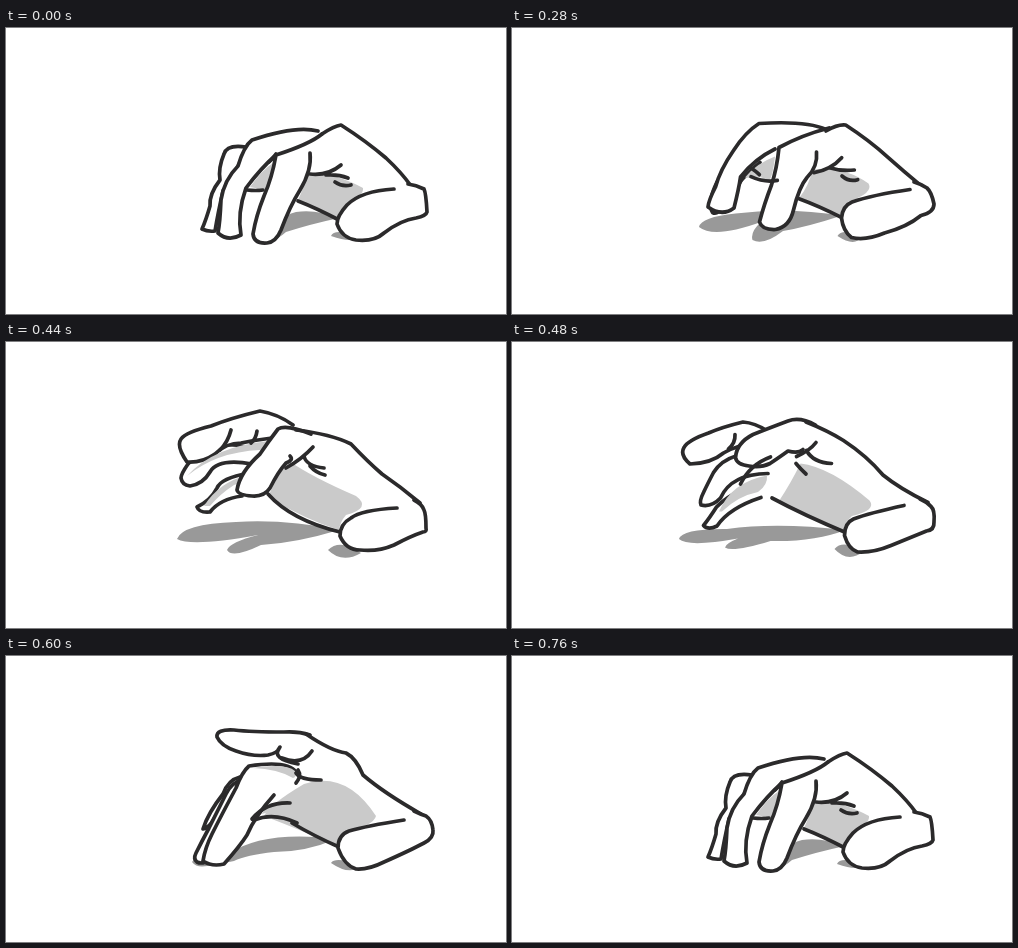
These frames come from a looping animation (500x286 px, 800 ms). An HTML page without scripts:

```html
<!DOCTYPE html>
<html lang="en">
<head>
<meta charset="utf-8">
<title>Drumming fingers</title>
<style>
html, body { margin: 0; width: 100%; height: 100%; overflow: hidden; background: #fff; }
svg { display: block; width: 100vw; height: 100vh; }

/* Poses are redrawn every 40 ms, so each move is cut into steps */
path {
  fill: #fff; stroke: #2b2a2b; stroke-width: 3.7;
  stroke-linecap: round; stroke-linejoin: round;
  animation: 800ms steps(2) infinite;
}
.flat { stroke: none; }
.shadow { fill: #999; animation-name: shadow; }
.hull { animation-name: hull; }
.pinky { animation-name: pinky; }
.ring { animation-name: ring; }
.middle { animation-name: middle; }
.tone { fill: #cacaca; animation-name: tone; }
.palm { fill: #cacaca; animation-name: palm; }
.lines { fill: none; animation-name: lines; }
.index { animation-name: index; }
.heel { animation-name: heel; }

@keyframes shadow {
  0%, 24.999%, 95%, 100% { d: path("M272 200Q278 186 290 184Q310 181 333 190Q305 196 280 204Q272 211 268 211Q266 208 268 204Q270 202 272 200ZM325 208Q328 200 352 208Q348 216 325 208Z") }
  25% { animation-timing-function: steps(4); d: path("M194 200Q198 192 232 187Q280 178 330 189Q300 196 278 203Q265 214 248 214Q244 208 250 196Q212 208 194 200ZM326 210Q330 200 352 210Q346 221 326 210Z") }
  45% { d: path("M180 198Q180 186 215 184Q270 180 330 186Q290 202 264 203Q238 222 233 210Q232 200 248 192Q192 214 180 198ZM325 206Q330 200 348 207Q340 218 325 206Z") }
  55% { d: path("M171 197Q176 182 230 180Q280 177 333 188Q290 201 255 203Q226 217 221 208Q224 200 252 193Q186 205 171 197ZM322 208Q334 196 355 211Q336 222 322 208Z") }
  65% { d: path("M163 197Q164 191 200 194Q250 183 334 188Q315 199 262 195Q215 204 205 203Q203 203 200 200Q166 206 163 197ZM323 206Q328 198 348 208Q336 221 323 206Z") }
  75% { animation-timing-function: steps(4); d: path("M186 206Q190 198 222 198Q258 174 330 183Q300 196 268 196Q240 199 228 205Q215 208 208 208Q192 214 186 206ZM325 207Q330 200 355 210Q344 220 325 207Z") }
}
@keyframes hull {
  0%, 24.999%, 90%, 100% { d: path("M268 130L312 106L334 97L380 130L404 157L388 185L332 192L292 173L275 165Z") }
  25% { animation-timing-function: steps(4); d: path("M268 130L310 105L328 97L370 124L408 157L390 185L330 190L290 172L275 165Z") }
  45% { d: path("M262 108L300 98L343 99L372 132L410 160L390 185L330 188L290 170L275 155Z") }
  55% { d: path("M275 88L300 92L343 101L372 128L412 160L390 185L335 190L268 158L262 145Z") }
  65% { d: path("M270 95L300 73L322 96L362 130L418 160L390 185L330 190L285 165L268 150Z") }
  75% { animation-timing-function: steps(3); d: path("M262 105L300 80L342 98L364 126L415 160L390 185L330 190L285 165L262 140Z") }
}
@keyframes pinky {
  0%, 24.999%, 90%, 100% { d: path("M232 122Q222 126 220 140Q210 175 205 196Q207 200 210 195Q220 160 232 130") }
  25% { animation-timing-function: steps(4); d: path("M240 125Q232 130 225 150Q217 180 212 195Q216 200 222 195Q230 170 240 140") }
  45% { d: path("M225 150Q215 155 208 160Q200 163 199 168Q203 172 207 168Q215 160 225 152") }
  55% { d: path("M243 131Q215 136 211 146Q205 158 191 165Q193 171 204 170Q214 157 236 154") }
  65% { d: path("M225 160Q212 175 198 184Q190 194 192 202Q199 206 206 198Q220 175 262 157") }
  75% { animation-timing-function: steps(3); d: path("M234 121Q222 124 217 138Q202 157 197 173Q203 172 208 163Q218 145 230 130") }
}
@keyframes ring {
  0%, 24.999%, 90%, 100% { d: path("M240 119Q221 116 218 126Q212 140 214 152Q203 166 204 178Q200 192 196 201Q202 204 209 203Q212 185 217 163") }
  25% { animation-timing-function: steps(4); d: path("M241 112Q230 116 227 124Q220 135 214 148Q207 165 204 175Q200 188 198 194Q201 198 206 195Q212 170 238 116") }
  45% { d: path("M225 148Q215 150 208 153Q200 158 196 160Q193 163 194 168Q196 174 203 175Q210 176 215 163Q225 149 258 153") }
  55% { d: path("M240 105Q220 100 205 106Q190 112 182 122Q175 132 175 136Q176 143 184 144Q197 142 204 130Q212 116 246 122") }
  65% { d: path("M268 126Q258 122 243 122Q228 125 221 139Q215 154 208 165Q198 176 194 182Q202 189 213 182Q226 148 266 141") }
  75% { animation-timing-function: steps(3); d: path("M236 124Q226 126 220 138Q210 158 203 172Q196 185 190 197Q187 203 191 206Q195 208 199 206Q212 175 240 130") }
}
@keyframes middle {
  0%, 24.999%, 95%, 100% { d: path("M312 103Q290 97 246 112Q238 118 232 138Q218 152 215 172Q214 195 212 205Q222 214 235 207Q231 185 240 160Q255 140 270 127") }
  25% { animation-timing-function: steps(4); d: path("M314 103Q300 97 242 111Q233 122 228 140Q216 162 211 182Q203 198 206 204Q224 212 231 198Q236 170 235 160Q250 140 270 130") }
  45% { d: path("M314 100Q290 88 252 80Q234 86 215 105Q200 122 196 136Q190 147 186 154Q196 166 213 162Q218 150 222 138Q235 122 256 112") }
  55% { d: path("M287 83Q272 72 254 69Q225 76 205 84Q180 90 175 97Q170 104 181 120Q196 121 209 112Q220 101 235 101Q250 98 266 96") }
  65% { d: path("M222 94Q214 90 208 91Q196 94 188 98Q171 107 169 114Q165 122 175 124Q202 122 214 110Q232 104 250 103Q266 108 269 128") }
  75% { animation-timing-function: steps(4); d: path("M290 116Q282 104 243 110Q236 116 230 132Q215 160 206 178Q199 192 197 205Q206 211 218 208Q234 190 241 179Q249 160 268 139") }
}
@keyframes tone {
  0%, 24.999%, 95%, 100% { d: path("M267 135Q256 142 244 159Q255 161 262 161Q266 150 267 135ZM250 160Q252 160 254 160Q254 161 252 161Q250 161 250 160Z") }
  25% { animation-timing-function: steps(4); d: path("M266 137Q248 147 238 160Q252 164 265 163Q267 150 266 137ZM250 160Q252 160 254 160Q254 161 252 161Q250 161 250 160Z") }
  45% { d: path("M260 120Q240 124 228 139Q240 136 247 145Q254 152 260 120ZM240 137Q244 137 248 140Q246 140 244 140Q242 140 240 137Z") }
  55% { d: path("M181 134Q208 104 263 99Q262 106 254 108Q210 110 181 134ZM198 164Q213 140 242 133Q240 140 228 143Q214 152 204 164Z") }
  65% { d: path("M259 99Q279 108 277 122Q274 130 271 126Q271 110 259 99ZM216 175Q226 140 268 134Q272 146 264 157Q238 156 216 175Z") }
  75% { animation-timing-function: steps(4); d: path("M247 112Q280 107 289 115Q291 121 287 122Q272 113 247 112ZM256 158Q260 148 268 147Q275 148 270 152Q264 156 256 158Z") }
}
@keyframes palm {
  0%, 24.999%, 95%, 100% { d: path("M300 146Q325 143 357 160Q358 168 340 177Q332 184 331 190Q308 182 292 172Q298 160 300 146Z") }
  25% { animation-timing-function: steps(4); d: path("M303 143Q332 140 355 154Q362 163 335 175Q330 182 328 189Q308 180 288 170Q298 158 303 143Z") }
  45% { d: path("M298 140Q330 135 358 157Q362 167 338 172Q331 180 329 187Q308 180 286 170Q296 158 298 140Z") }
  55% { d: path("M283 119Q306 135 350 154Q366 166 340 173Q334 180 333 188Q300 178 262 155Q270 135 283 119Z") }
  65% { d: path("M294 124Q330 115 365 163Q364 170 340 175Q331 181 330 189Q298 170 272 163Q286 150 294 124Z") }
  75% { animation-timing-function: steps(4); d: path("M298 128Q340 114 370 160Q368 169 338 178Q331 184 330 190Q300 176 258 160Q264 148 298 128Z") }
}
/* back of the hand, palm edge, then short creases */
@keyframes lines {
  0%, 24.999%, 90%, 100% { d: path("M316 106Q328 98 335 97Q360 113 380 130Q396 145 405 158M292 173Q310 180 333 192M304 146Q322 148 335 137M320 147Q332 146 342 150M329 154Q336 159 345 157M241 162Q250 163 257 162M263 134Q268 129 270 126") }
  25% { animation-timing-function: steps(3); d: path("M314 105Q324 96 329 96Q355 112 378 128Q395 142 408 157M288 171Q308 178 329 190M302 146Q320 142 329 129M318 141Q330 146 343 142M331 149Q338 155 345 153M237 161Q252 166 266 163M233 150Q236 155 235 161") }
  45% { animation-timing-function: steps(2); d: path("M314 99Q330 96 343 99Q362 113 372 132Q384 145 410 158M285 170Q305 178 330 188M302 142Q318 140 331 131M316 137Q328 138 341 142M328 146Q336 153 347 149M243 124Q255 133 264 131M248 118Q262 122 272 118") }
  55% { d: path("M290 88Q325 92 345 102Q362 120 376 132Q395 145 414 161M262 152Q285 178 334 190M280 126Q296 117 307 105M298 114Q300 124 318 126M304 124Q310 131 319 133M214 108Q222 100 225 88M245 101Q250 97 251 89") }
  65% { d: path("M298 72Q306 85 318 95Q348 108 366 134Q380 148 418 160M258 160Q298 168 338 193M289 103Q300 100 301 96M291 103Q302 117 321 117M264 119Q268 124 269 131M219 106Q225 102 221 97M212 183Q226 148 266 141") }
  75% { animation-timing-function: steps(3); d: path("M300 78Q325 95 340 97Q350 102 357 119Q378 137 415 158M286 167Q308 180 333 191M276 102Q296 110 306 95M290 117Q294 124 315 124M292 114Q296 120 290 127M248 164Q268 156 291 167M246 163Q260 146 284 147") }
}
@keyframes index {
  0%, 24.999%, 95%, 100% { d: path("M316 106Q304 116 270 127Q266 150 258 168Q250 188 247 206Q248 216 261 215Q270 214 275 202Q284 178 294 162Q306 142 304 125") }
  25% { animation-timing-function: steps(4); d: path("M318 102Q305 112 268 129Q270 150 262 168Q254 188 249 204Q250 214 265 214Q279 210 281 192Q286 168 296 155Q306 142 303 128") }
  45% { d: path("M316 98Q275 102 266 110Q260 130 257 146Q250 165 246 184Q250 190 262 189Q276 188 282 172Q288 150 294 144Q306 135 306 120") }
  55% { d: path("M305 92Q280 82 272 87Q262 100 254 112Q234 130 231 148Q232 153 246 154Q258 155 264 146Q272 130 280 121Q288 118 284 114") }
  65% { d: path("M302 74Q296 67 280 71Q250 73 228 73Q215 72 216 83Q217 92 228 94Q240 97 252 97Q265 99 272 97Q285 106 298 101") }
  75% { animation-timing-function: steps(4); d: path("M304 79Q292 75 278 76Q245 76 228 74Q210 73 211 81Q215 90 230 95Q247 101 262 99Q272 97 274 91Q264 103 292 108") }
}
@keyframes heel {
  0%, 24.999%, 90%, 100% { d: path("M388 161Q355 163 341 177Q331 188 331 196Q336 210 350 212Q368 214 378 205Q395 192 410 190Q420 188 421 184Q420 165 418 161Q410 157 402 156") }
  25% { animation-timing-function: steps(4); d: path("M402 160Q360 166 340 174Q328 180 328 190Q334 200 343 212Q352 216 370 207Q395 196 410 184Q423 184 423 178Q419 163 416 159Q410 156 404 155") }
  45% { d: path("M394 163Q360 168 340 174Q333 176 331 190Q328 206 336 207Q355 210 375 203Q395 202 408 191Q421 185 421 174Q420 165 414 161Q408 156 400 153") }
  55% { d: path("M391 166Q355 168 345 176Q334 182 334 194Q340 208 354 208Q372 210 388 203Q405 194 417 190Q421 190 420 186Q420 172 418 168Q416 162 408 158") }
  65% { d: path("M393 161Q360 174 338 178Q331 180 331 193Q333 206 337 212Q350 212 370 204Q395 196 412 188Q424 186 424 174Q426 164 420 161Q414 158 408 156") }
  75% { animation-timing-function: steps(3); d: path("M398 164Q360 170 343 175Q332 179 332 192Q338 209 350 213Q362 214 378 206Q405 194 418 187Q428 182 427 174Q426 164 420 160Q414 158 408 155") }
}
</style>
</head>
<body>
<svg viewBox="0 0 500 286" preserveAspectRatio="none">
  <path class="flat shadow"/>
  <path class="flat hull"/>
  <path class="pinky"/>
  <path class="ring"/>
  <path class="middle"/>
  <path class="flat tone"/>
  <path class="flat palm"/>
  <path class="index"/>
  <path class="lines"/>
  <path class="heel"/>
</svg>
</body>
</html>
```
